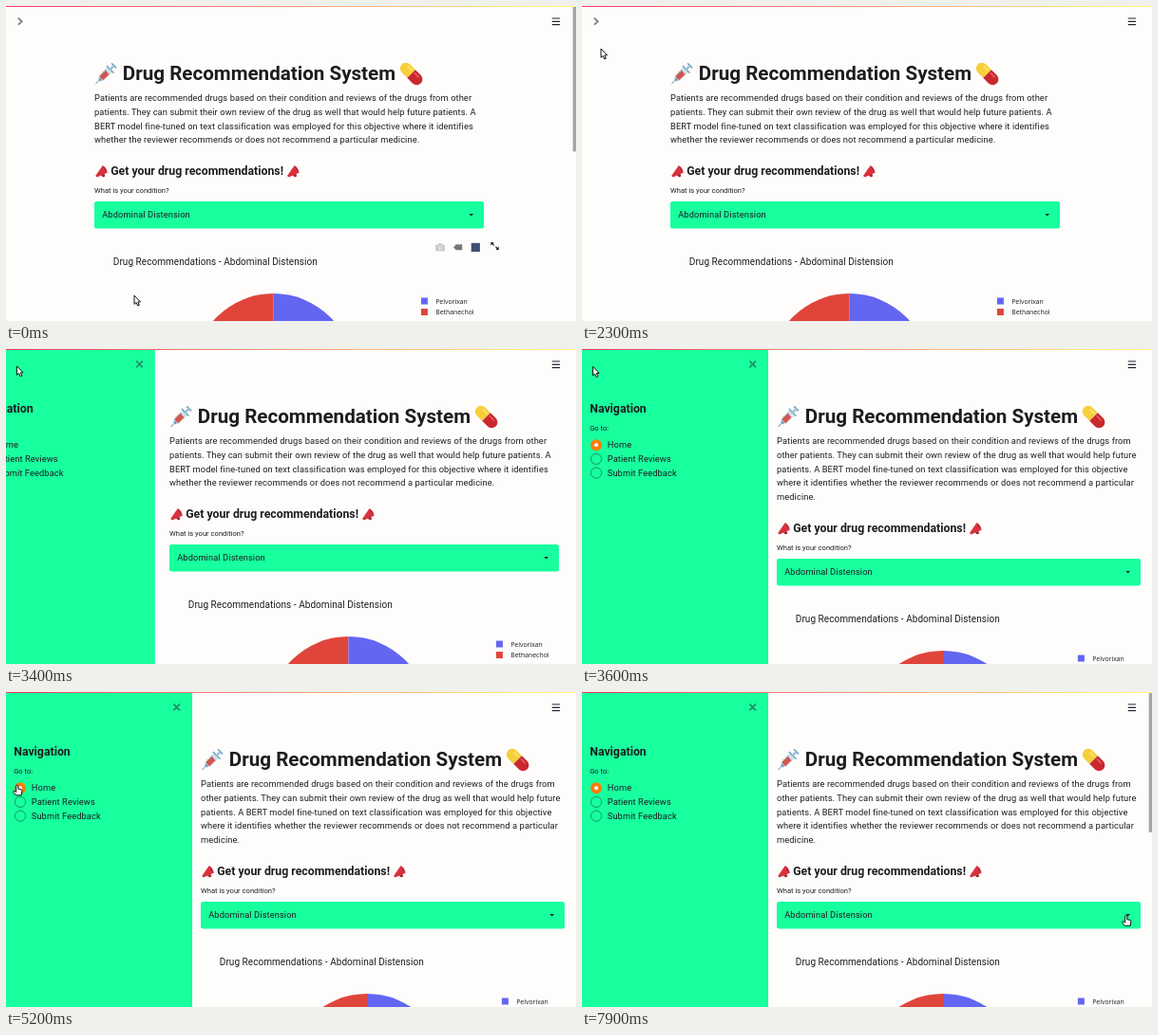
An HTML page for the animation above (8000 ms loop, 600 by 332 pixels).

```html
<!DOCTYPE html>
<html lang="en">
<head>
<meta charset="utf-8">
<title>Drug Recommendation System</title>
<style>
  html, body { margin: 0; width: 100%; height: 100%; overflow: hidden; background: #fefdfc; }
  svg { display: block; width: 600px; height: 332px; }
  text { font: 9.3px Roboto, sans-serif; letter-spacing: .09px; fill: #1d1d20; white-space: pre; }
  .h1 { font-size: 20.6px; font-weight: 700; letter-spacing: 0; }
  .h3 { font-size: 12.3px; font-weight: 700; letter-spacing: 0; }
  .label { font-size: 7.6px; letter-spacing: 0; }
  .title { font-size: 10px; letter-spacing: .05px; }
  .legend { font: 6.9px "Open Sans", sans-serif; letter-spacing: 0; }
  .ring { fill: none; stroke: #149a66; stroke-width: 1; }
</style>
</head>
<body>
<svg viewBox="0 0 600 332">
  <defs>
    <linearGradient id="strip"><stop stop-color="#f63366"/><stop offset="1" stop-color="#fffd80"/></linearGradient>
    <g id="megaphone">
      <path d="M6 10.2 8.6 13.2 11.2 12 9.4 9z" fill="#9c2a35"/>
      <path d="M.8 11.6 8.4 .8 13.4 8.4 2.4 13.2z" fill="#d8323b"/>
      <path d="M8.4 .8Q12.6 3.6 13.4 8.4Q10 5.6 8.4 .8z" fill="#a81f32"/>
    </g>
    <g id="syringe" transform="rotate(-45)" stroke-linecap="round">
      <path d="M-14 0H-7" stroke="#8fa3ad" stroke-width="1"/>
      <rect x="-9" y="-1.8" width="3" height="3.6" fill="#5f9bc0"/>
      <rect x="-7" y="-3.8" width="14" height="7.6" rx="1" fill="#cfe2ea"/>
      <rect x="-6.4" y="-2.8" width="9" height="5.6" fill="#d9524c"/>
      <path d="M-3 -3.4V-1M0 -3.4V-1M3 -3.4V-1" stroke="#6e8792" stroke-width=".7"/>
      <path d="M7 -4.8V4.8M12.6 -2.8V2.8" stroke="#6fa4c4" stroke-width="1.6"/>
      <path d="M7 0H12.6" stroke="#9cc0d0" stroke-width="2.4"/>
    </g>
    <g id="pill" transform="rotate(45)">
      <path d="M0 -6.1H-8A6.1 6.1 0 0 0 -8 6.1H0z" fill="#f6cf3a"/>
      <path d="M0 -6.1H8A6.1 6.1 0 0 1 8 6.1H0z" fill="#c9282f"/>
      <path d="M-8 -3H-2" stroke="#fbe680" stroke-width="1.5" stroke-linecap="round"/>
      <path d="M2 -3H8" stroke="#e0645f" stroke-width="1.5" stroke-linecap="round"/>
    </g>
  </defs>

  <rect width="600" height="332" fill="#fefdfc"/>

  <g id="main">
    <use href="#syringe" transform="translate(11.7 71.8)"/>
    <text class="h1" x="29.8" y="78.3">Drug Recommendation System</text>
    <use href="#pill" transform="translate(333.6 71.5)"/>
    <g id="intro"></g>
    <g id="lower">
      <use href="#megaphone" transform="translate(.4 167.3)"/>
      <text class="h3" x="17.2" y="178.2">Get your drug recommendations!</text>
      <use href="#megaphone" transform="translate(202.2 167.3)"/>
      <text class="label" x="0" y="197">What is your condition?</text>
      <rect id="select" y="206" height="28.5" rx="2.3" fill="#18ff9e"/>
      <text x="8.2" y="223.2">Abdominal Distension</text>
      <path id="caret" d="M-2.3 219H2.3L0 221.6z" fill="#1d1d20"/>
      <text class="title" x="19.8" y="273.2">Drug Recommendations - Abdominal Distension</text>
      <g id="pie">
        <path d="M0 303A84 84 0 0 0 0 471z" fill="#e0453b"/>
        <path d="M0 303A84 84 0 0 1 0 471z" fill="#6366f1"/>
      </g>
      <g id="legend">
        <rect x="-15.3" y="307.5" width="7" height="7" fill="#6366f1"/>
        <rect x="-15.3" y="319" width="7" height="7" fill="#e0453b"/>
        <text class="legend" y="313.7">Pelvorixan</text>
        <text class="legend" y="325.2">Bethanechol</text>
      </g>
    </g>
  </g>

  <g id="modebar">
    <path d="M452.3 251.8H454.6L455.4 250.3H458.6L459.4 251.8H461.7V258.3H452.3z" fill="#c3c3c5"/>
    <circle cx="457" cy="254.8" r="1.9" fill="#c3c3c5" stroke="#fefdfc" stroke-width=".9"/>
    <path d="M471 254.3 473.8 251.3H480.2V257.3H473.8z" fill="#77777b"/>
    <rect x="489.7" y="249.8" width="9.2" height="9.2" fill="#3f4f75"/>
    <path d="M510.3 252.5V249H513.8zM518.8 253.5V257H515.3z" fill="#262730"/>
    <path d="M511.3 250 513.7 252.4M517.8 256 515.4 253.6" stroke="#262730" stroke-width="1.3"/>
  </g>

  <path d="M574.8 13H583M574.8 16.3H583M574.8 19.6H583" stroke="#262730" stroke-width="1.2"/>
  <rect id="scrollbar" x="596.7" y="0" width="3.3" rx="1" fill="#a5a5a5"/>

  <g id="opener">
    <g id="glow">
      <rect x="3" y="4" width="25" height="25" rx="3.5" fill="#f5b766"/>
      <rect x="4.8" y="5.8" width="21.4" height="21.4" rx="2" fill="#e2841c"/>
    </g>
    <path id="chevron" d="M12.8 12.6 16.6 16.2 12.8 19.8" fill="none" stroke-width="2"/>
  </g>

  <g id="sidebar">
    <rect width="196" height="332" fill="#18ff9e"/>
    <path d="M176.4 12.7 183 19.3M183 12.7 176.4 19.3" stroke="#1f9367" stroke-width="1.8"/>
    <text class="h3" x="8.2" y="66.8">Navigation</text>
    <text class="label" x="8.2" y="85.7">Go to:</text>
    <circle cx="15" cy="101.2" r="6" fill="#f77d0c"/>
    <circle cx="15" cy="101.2" r="2.1" fill="#f4f4ee"/>
    <circle class="ring" cx="15" cy="115.9" r="5.6"/>
    <circle class="ring" cx="15" cy="130.6" r="5.6"/>
    <text x="26.8" y="104.4">Home</text>
    <text x="26.8" y="119.1">Patient Reviews</text>
    <text x="26.8" y="133.8">Submit Feedback</text>
  </g>

  <rect width="600" height="1" fill="url(#strip)"/>

  <g id="cursor" fill="#fff" stroke="#111" stroke-width="1" stroke-linejoin="round">
    <path id="arrow" d="M0 0V9.4L2.1 7.5 3.7 11 5.3 10.3 3.8 6.9H6.5z"/>
    <path id="hand" d="M-1.3 6.2V1.2A1 1 0 0 1 .8 1.2V4.2L4 4.9Q5 5.2 4.9 6.4L4.2 10.8H-1.6L-4.3 7.4Q-4.3 5.9 -2.9 6.3L-1.3 7.6z"/>
  </g>
</svg>
<script>
const LOOP = 8000, TICK = 100, LINE = 14.72;
const SIDEBAR = 196, VIEW = 596.5, MAX_WIDTH = 410, PADDING = 8.8;

const WIDE_INTRO = [
  'Patients are recommended drugs based on their condition and reviews of the drugs from other',
  'patients. They can submit their own review of the drug as well that would help future patients. A',
  'BERT model fine-tuned on text classification was employed for this objective where it identifies',
  'whether the reviewer recommends or does not recommend a particular medicine.'
];
const NARROW_INTRO = [
  'Patients are recommended drugs based on their condition and reviews of the drugs from',
  'other patients. They can submit their own review of the drug as well that would help future',
  'patients. A BERT model fine-tuned on text classification was employed for this objective',
  'where it identifies whether the reviewer recommends or does not recommend a particular',
  'medicine.'
];

// Rows of [time, ...values], joined by straight lines.
const POINTER = [
  [0, 135, 305], [900, 135, 305], [1400, 116, 300], [1700, 62, 210], [2400, 13, 17.5],
  [3200, 13, 17.5], [3400, 11.5, 18], [4000, 11.5, 19.8], [4700, 12, 98], [5300, 12, 98],
  [5700, 215, 150], [6600, 430, 215], [7500, 573, 235.5], [LOOP, 573, 235.5]
];
const SLIDE = [[0, 0], [3200, 0], [3300, .22], [3400, .8], [3500, .976], [3600, 1], [LOOP, 1]];
const HAND_TIMES = [[2400, 3300], [4700, 5400], [6900, LOOP]];

const $ = id => document.getElementById(id);
const show = (id, on) => $(id).setAttribute('visibility', on ? 'visible' : 'hidden');
const move = (id, x, y = 0) => $(id).setAttribute('transform', `translate(${x} ${y})`);
const within = (t, [from, to]) => t >= from && t < to;

function sample(rows, t) {
  const i = rows.findIndex(row => row[0] > t);
  const [a, b] = [rows[i - 1], rows[i]];
  const k = (t - a[0]) / (b[0] - a[0]);
  return a.slice(1).map((v, n) => v + (b[n + 1] - v) * k);
}

let introLines;
function setIntro(lines) {
  if (lines === introLines) return;
  introLines = lines;
  $('intro').innerHTML = lines.map((line, i) => `<text y="${100.3 + i * LINE}">${line}</text>`).join('');
}

function layout(open) {
  const side = SIDEBAR * open;
  const room = VIEW - side;
  const width = Math.round(Math.min(MAX_WIDTH, room - 2 * PADDING));
  const narrow = width < 397;
  setIntro(narrow ? NARROW_INTRO : WIDE_INTRO);
  move('main', Math.round(side + (room - width) / 2));
  move('lower', 0, narrow ? Math.round(LINE) : 0);
  $('select').setAttribute('width', width);
  move('caret', width - 13.3);
  move('pie', width / 2 - 16.5);
  move('legend', width - 50.8);
  move('sidebar', side - SIDEBAR);
}

function render(t) {
  const [open] = sample(SLIDE, t);
  layout(open);

  const hot = within(t, [2400, 3300]);
  show('opener', open === 0);
  $('glow').style.opacity = hot ? 1 : 0;
  $('chevron').setAttribute('stroke', hot ? '#fff3e0' : '#8a8a8e');
  show('modebar', t < 1600);
  show('scrollbar', t < 2300 || t >= 5500);
  $('scrollbar').setAttribute('height', open ? 148 : 153.5);

  const hand = HAND_TIMES.some(span => within(t, span));
  show('hand', hand);
  show('arrow', !hand);
  move('cursor', ...sample(POINTER, t));
}

const start = performance.now();
function frame() {
  const t = (performance.now() - start) % LOOP;
  render(Math.floor(t / TICK) * TICK);
  requestAnimationFrame(frame);
}
frame();
</script>
</body>
</html>
```
